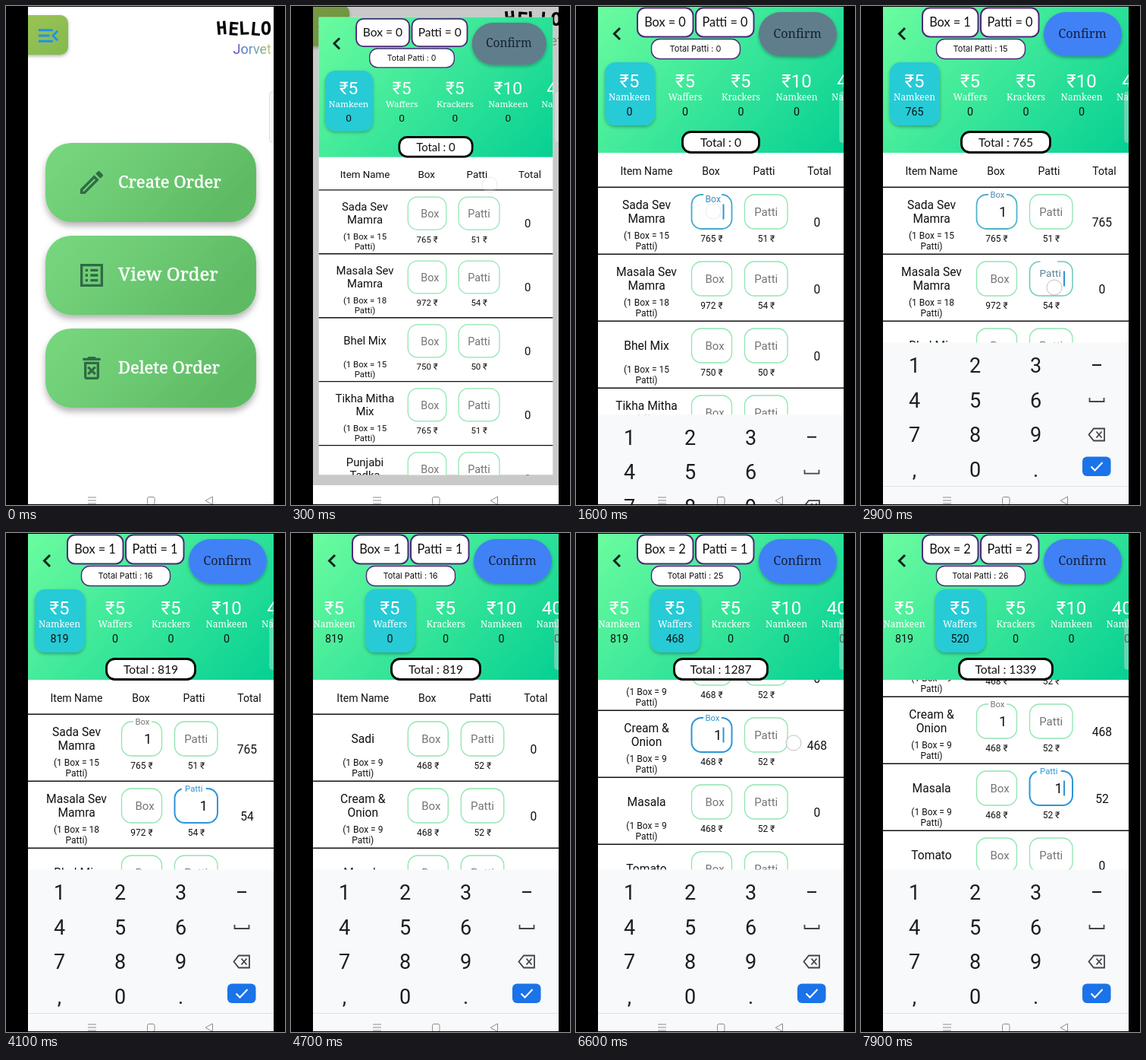
An HTML page for the animation above (8000 ms loop, 368 by 656 pixels).

```html
<!DOCTYPE html>
<html lang="en">
<head>
<meta charset="utf-8">
<title>Order app</title>
<style>
html, body { margin: 0; width: 100%; height: 100%; overflow: hidden; background: #000; }
svg { display: block; width: 368px; height: 656px; }
text { font-family: Roboto, "Noto Sans", sans-serif; white-space: pre; }
.serif { font-family: "Noto Serif", serif; }
.round { font-family: Lato, sans-serif; }
.wide { font-family: Inter, sans-serif; }
.mono { font-family: "DejaVu Sans Mono", monospace; font-weight: bold; }
.heavy { stroke: #fff; stroke-width: .5; }
</style>
</head>
<body>
<svg viewBox="0 0 368 656">
  <defs>
    <linearGradient id="card" x2="1" y2=".35"><stop stop-color="#77d87f"/><stop offset=".5" stop-color="#6dcb74"/><stop offset="1" stop-color="#5fbb64"/></linearGradient>
    <linearGradient id="corner" x2="1" y2="1"><stop stop-color="#9cc453"/><stop offset="1" stop-color="#84ba50"/></linearGradient>
    <linearGradient id="head" gradientUnits="userSpaceOnUse" x1="60" y1="-30" x2="322" y2="222"><stop stop-color="#6bfc9f"/><stop offset="1" stop-color="#06d093"/></linearGradient>
    <linearGradient id="name"><stop stop-color="#5d45b5"/><stop offset=".4" stop-color="#5f8fd0"/><stop offset=".75" stop-color="#7fb08c"/><stop offset="1" stop-color="#cfc56a"/></linearGradient>
    <filter id="shade" x="-20%" y="-20%" width="140%" height="150%"><feDropShadow dx="0" dy="5" stdDeviation="4" flood-opacity=".3"/></filter>
    <filter id="soft" x="-20%" y="-20%" width="140%" height="150%"><feDropShadow dx="0" dy="2" stdDeviation="2" flood-opacity=".3"/></filter>
    <clipPath id="phone"><rect x="29" y="1" width="324" height="654"/></clipPath>
    <clipPath id="body"><rect x="29" y="0" width="324" height="631"/></clipPath>
  </defs>
  <rect width="368" height="656"/>
  <g id="screen" clip-path="url(#phone)"></g>
</svg>
<script>
const LOOP = 8000, STEP = 100;
const screen_ = document.getElementById('screen');

// Drawing helpers
const text = (x, y, str, size, fill = '#111', more = '') =>
  `<text x="${x}" y="${y + size * .36}" font-size="${size}" fill="${fill}" text-anchor="middle" ${more}>${str}</text>`;
const box = (x, y, w, h, r, fill, more = '') =>
  `<rect x="${x}" y="${y}" width="${w}" height="${h}" rx="${r}" fill="${fill}" ${more}/>`;
const line = (d, stroke, width, more = '') =>
  `<path d="${d}" fill="none" stroke="${stroke}" stroke-width="${width}" ${more}/>`;
const icon = (x, y, size, fill, d) =>
  `<path transform="translate(${x - size / 2} ${y - size / 2}) scale(${size / 24})" fill="${fill}" d="${d}"/>`;
const move = (x, y, inner) => `<g transform="translate(${x} ${y})">${inner}</g>`;
const zoom = (s, inner) => `<g transform="translate(191 315) scale(${s}) translate(-191 -315)">${inner}</g>`;

// Timing helpers
const ramp = (t, start, length) => Math.min(1, Math.max(0, (t - start) / length));
const easeOut = u => 1 - (1 - u) ** 2;
const easeBoth = u => u < .5 ? 4 * u ** 3 : 1 - (2 - 2 * u) ** 3 / 2;
const blend = (a, b, u) => `rgb(${a.map((v, i) => Math.round(v + (b[i] - v) * u))})`;

const GREEN = [142, 230, 174], BLUE = [45, 150, 215], GREY = [117, 117, 117];

// Product rows: name, patti per box, price per patti
const PAGES = [
  [['Sada Sev|Mamra', 15, 51], ['Masala Sev|Mamra', 18, 54], ['Bhel Mix', 15, 50],
   ['Tikha Mitha|Mix', 15, 51], ['Punjabi|Tadka', 15, 51]],
  [['Sadi', 9, 52], ['Cream &amp;|Onion', 9, 52], ['Masala', 9, 52], ['Tomato', 9, 52], ['Onion', 9, 52]],
];
const TABS = [['₹5', 'Namkeen'], ['₹5', 'Waffers'], ['₹5', 'Krackers'], ['₹10', 'Namkeen'], ['400', 'Namkeen']];

const EDITS = [
  { page: 0, row: 0, col: 'Box', focus: 1450, typed: 2300, blur: 2830 },
  { page: 0, row: 1, col: 'Patti', focus: 2830, typed: 3500, blur: 4300 },
  { page: 1, row: 1, col: 'Box', focus: 5730, typed: 6200, blur: 7130 },
  { page: 1, row: 2, col: 'Patti', focus: 7130, typed: 7600, blur: 9000 },
];

// Touches: start, end, x, y, drag distance
const TOUCHES = [
  [100, 200, 262, 235, 0], [1400, 1500, 181, 270, 0], [2200, 2300, 70, 472, 0],
  [2700, 2900, 255, 370, 0], [3400, 3500, 70, 472, 0], [4200, 4300, 144, 120, 0],
  [4900, 5400, 275, 395, -100], [5600, 5700, 180, 265, 0], [6100, 6200, 70, 472, 0],
  [6500, 6900, 287, 276, -30], [7000, 7100, 251, 338, 0], [7500, 7600, 70, 472, 0],
];

const ICONS = {
  edit: 'M14.06 9.02l.92.92L5.92 19H5v-.92l9.06-9.06M17.66 3c-.25 0-.51.1-.7.29l-1.83 1.83 3.75 3.75 1.83-1.83c.39-.39.39-1.02 0-1.41l-2.34-2.34c-.2-.2-.45-.29-.71-.29zm-3.6 3.19L3 17.25V21h3.75L17.81 9.94l-3.75-3.75z',
  list: 'M19 5v14H5V5h14m2-2H3v18h18zM11 7h6v2h-6zm0 4h6v2h-6zm0 4h6v2h-6zM7 7h2v2H7zm0 4h2v2H7zm0 4h2v2H7z',
  bin: 'M14.12 10.47L12 12.59l-2.13-2.12-1.41 1.41L10.59 14l-2.12 2.12 1.41 1.41L12 15.41l2.12 2.12 1.41-1.41L13.41 14l2.12-2.12zM15.5 4l-1-1h-5l-1 1H5v2h14V4zM6 19c0 1.1.9 2 2 2h8c1.1 0 2-.9 2-2V7H6v12zM8 9h8v10H8V9z',
  menu: 'M3 18h13v-2H3v2zm0-5h10v-2H3v2zm0-7v2h13V6H3zm18 9.59L17.42 12 21 8.41 19.59 7l-5 5 5 5L21 15.59z',
};

function home() {
  const cards = [['Create Order', 22, 'edit'], ['View Order', 24, 'list'], ['Delete Order', 22, 'bin']];
  return box(29, 0, 324, 656, 0, '#fff') +
    box(15, 12, 67, 52, 10, 'url(#corner)', 'filter="url(#soft)"') +
    icon(56, 39, 35, '#2391e8', ICONS.menu) +
    `<text class="mono" x="278" y="38" font-size="24" rotate="-5 4 -3 5 0">HELLO</text>` +
    `<text x="350" y="63" font-size="18" text-anchor="end" fill="url(#name)">Jorvet</text>` +
    cards.map(([label, size, key], i) => {
      const y = 180 + 122 * i;
      return box(52, y, 278, 104, 34, 'url(#card)', 'filter="url(#shade)"') +
        icon(113, y + 52, 40, '#2f6b45', ICONS[key]) +
        `<text class="serif heavy" x="148" y="${y + 59}" font-size="${size}" fill="#fff">${label}</text>`;
    }).join('');
}

const price = e => {
  const [, count, unit] = PAGES[e.page][e.row];
  return e.col === 'Box' ? count * unit : unit;
};
const sum = (list, f) => list.reduce((n, e) => n + f(e), 0);

function field(t, x, y, w, col, edit) {
  const on = edit ? ramp(t, edit.focus, 200) : 0;
  const lit = edit ? on * (1 - ramp(t, edit.blur, 200)) : 0;
  const h = 45, mid = y + h / 2, cx = x + w / 2;
  const rest = col === 'Box' ? cx + 4 : cx;
  const end = col === 'Box' ? cx + 1 : cx - 3;
  let out = box(x, y, w, h, 13, '#fff', `stroke="${blend(GREEN, BLUE, lit)}" stroke-width="${1.3 + .7 * lit}"`);
  if (on) {
    const gap = (col === 'Box' ? 24 : 32) * Math.min(1, on * 2);
    out += box(end - gap / 2, y - 2, gap, 4, 0, '#fff');
  }
  out += text(rest + (end - rest) * on, mid - 22.5 * on, col, 15 - 3.7 * on, blend(GREY, BLUE, lit));
  if (edit) {
    const has = t >= edit.typed;
    if (has) out += text(x + w - 13, mid, '1', 18.5, '#111', 'style="text-anchor:end"');
    const since = t - (has ? edit.typed : edit.focus);
    if (t >= edit.focus && t < edit.blur && Math.floor(since / 500) % 2 === 0)
      out += box(x + w - 12, mid - 10, 2, 20, 0, blend(BLUE, BLUE, 0));
  }
  return out;
}

function list(t, page, edits) {
  const rule = y => line(`M29 ${y}H353`, '#111', 1.4);
  let out = text(93, 217, 'Item Name', 14) + text(178, 217, 'Box', 14) +
    text(248, 217, 'Patti', 14) + text(321, 217, 'Total', 14) + rule(238.3);
  PAGES[page].forEach(([name, count, unit], i) => {
    const y = 238 + 88 * i;
    const mine = EDITS.filter(e => e.page === page && e.row === i);
    const find = col => mine.find(e => e.col === col);
    const words = name.split('|');
    words.forEach((w, k) => out += text(93, y + 32 + (k - (words.length - 1) / 2) * 18, w, 15.6));
    out += text(93, y + 64, `(1 Box = ${count}`, 12) + text(93, y + 78, 'Patti)', 12) +
      field(t, 152.5, y + 10, 53, 'Box', find('Box')) +
      field(t, 222.5, y + 10, 56.5, 'Patti', find('Patti')) +
      text(179, y + 68, `${count * unit} ₹`, 12) + text(251, y + 68, `${unit} ₹`, 12) +
      text(318, y + 46, sum(edits.filter(e => e.page === page && e.row === i), price), 15.6) +
      rule(y + 88.3);
  });
  return out;
}

function header(edits, swipe) {
  const total = sum(edits, price);
  const boxes = edits.filter(e => e.col === 'Box');
  const loose = edits.length - boxes.length;
  const pieces = loose + sum(boxes, e => PAGES[e.page][e.row][1]);
  const pill = [0, 101, 110, 117, 123][String(total).length];
  const edge = w => `stroke="#4c2a78" stroke-width="${w}"`;
  const shift = -13.5 * swipe;
  let out = box(29, 0, 324, 193, 0, 'url(#head)') +
    line('M58 29L50.5 36.5L58 44', '#10251c', 3) +
    box(81, 2.5, 73.5, 38, 10, '#fff', edge(2)) + text(117.5, 21, `Box = ${boxes.length}`, 16.3, '#111', 'class="round"') +
    box(158, 2.5, 76.5, 38, 10, '#fff', edge(2)) + text(196.5, 21, `Patti = ${loose}`, 16.3, '#111', 'class="round"') +
    box(99.5, 43.5, 117, 26, 11, '#fff', edge(1.4)) + text(157.5, 56, `Total Patti : ${pieces}`, 11, '#111', 'class="wide"') +
    box(241, 8, 103, 58, 29, total ? '#3f81f6' : '#607d8b', 'filter="url(#soft)"') +
    text(292, 36, 'Confirm', 16.2, '#14203a', 'class="serif"') +
    box(38 + 60 * swipe, 74, 66, 83, 14, '#27cbd6', 'filter="url(#soft)"');
  TABS.forEach(([cost, label], i) => {
    const x = 70.5 + 73.5 * i + shift;
    out += text(x, 98, cost, 24, '#fff') + text(x, 120, label, 12.1, '#fff', 'class="serif"') +
      text(x, 139, sum(edits.filter(e => e.page === i), price), 14.3);
  });
  return out + box(191 - pill / 2, 165.5, pill, 27, 11, '#fff', 'stroke="#000" stroke-width="2.8"') +
    text(191, 179, `Total : ${total}`, 15.6, '#111', 'class="round"');
}

function order(t) {
  const edits = EDITS.filter(e => t >= e.typed);
  const swipe = easeBoth(ramp(t, 4300, 450));
  const scroll = 93 * easeBoth(ramp(t, 5000, 450)) + 18 * easeBoth(ramp(t, 6600, 350));
  let out = box(29, 0, 324, 631, 0, '#fff');
  if (swipe < 1) out += move(-324 * swipe, 0, list(t, 0, edits));
  if (swipe > 0) out += move(324 * (1 - swipe), -scroll, list(t, 1, edits));
  return `<g clip-path="url(#body)">${out}${header(edits, swipe)}</g>`;
}

function keyboard(t) {
  const up = easeOut(ramp(t, 1450, 450));
  if (!up) return '';
  const ink = '#1d1e21', rows = ['123', '456', '789', ',0.'];
  let out = box(29, 442.5, 324, 214, 0, '#f8f9fb');
  rows.forEach((row, r) => [...row].forEach((key, c) =>
    out += text(70.5 + 80 * c, 472.5 + 45.6 * r, key, 27, ink)));
  out += line('M305 472H317', ink, 2) +
    line('M301.5 515V520H320.5V515', '#444', 1.8) +
    line('M307 555.5H321V571.5H307L300.5 563.5Z', '#444', 1.8) +
    line('M310.5 559.5L317.5 567.5M317.5 559.5L310.5 567.5', '#444', 1.8) +
    box(292, 592.5, 37.5, 25.5, 6, '#1a73e8') +
    line('M303.5 605.5L308.5 610.5L318.5 600', '#fff', 2);
  if (up === 1) out += line('M29 631.5H353', '#dfe1e5', 1);
  return move(0, 213 * (1 - up), out);
}

const navBar = line('M108 646H119M108 650H119M108 654H119', '#8b8b8b', 1) +
  box(186.5, 645.5, 9.5, 10, 2, 'none', 'stroke="#8b8b8b"') +
  line('M272.5 645V655.5L263 650.3Z', '#8b8b8b', 1);

const touches = t => TOUCHES.map(([from, to, x, y, dy]) => {
  if (t < from || t > to + 100) return '';
  const drag = dy * easeBoth(ramp(t, from + 100, to - from - 100 || 1));
  return `<circle cx="${x}" cy="${y + drag}" r="10" fill="#fff" fill-opacity=".6" stroke="#999" stroke-opacity=".6" opacity="${t > to ? .35 : 1}"/>`;
}).join('');

// Page opening: page scale, page opacity, backdrop scale, dimming
const OPENING = [[.87, .5, 1.02, .12], [.954, 1, 1.045, .21], [.988, 1, 1.05, .24]];

function draw(t) {
  let out;
  const k = t / STEP - 2;
  if (k < 0) out = home();
  else if (k < OPENING.length) {
    const [scale, alpha, back, dim] = OPENING[k];
    out = zoom(back, home()) + box(29, 0, 324, 656, 0, '#000', `opacity="${dim}"`) +
      `<g opacity="${alpha}">${zoom(scale, order(t))}</g>`;
  } else out = order(t);
  if (k >= 0) out += box(29, 630, 324, 26, 0, '#fff');
  out += keyboard(t) + navBar +
    box(347.5, 112.5, 14, 67, 4, '#eee', 'fill-opacity=".35" stroke="#bbb" stroke-opacity=".45"');
  screen_.innerHTML = out + touches(t);
}

const start = performance.now();
let shown = -1;
function tick() {
  const t = Math.floor(((performance.now() - start) % LOOP) / STEP) * STEP;
  if (t !== shown) draw(shown = t);
  requestAnimationFrame(tick);
}
tick();
</script>
</body>
</html>
```
